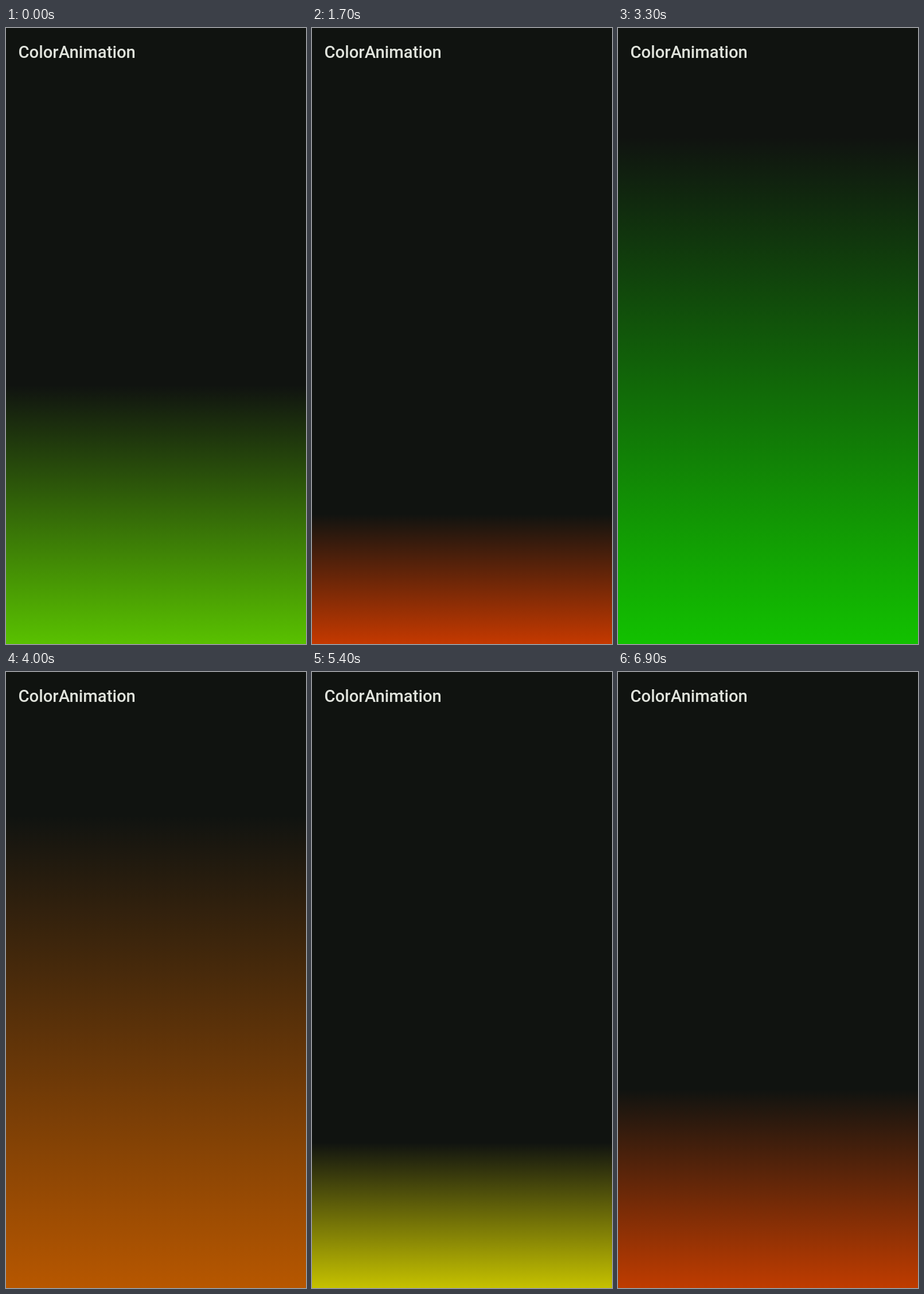
Animation of 523 by 1071 pixels, one loop 7000 ms. Source, as an HTML page:

```html
<!DOCTYPE html>
<html lang="en">
<head>
<meta charset="utf-8">
<title>ColorAnimation</title>
<style>
  html, body { margin: 0; width: 100%; height: 100%; overflow: hidden; background: #101310; }
  #glow { position: absolute; left: 0; right: 0; bottom: 0; }
  svg { position: absolute; left: 0; top: 0; }
  text { font: 500 29.3px Roboto, sans-serif; fill: #e0e3dc; }
</style>
</head>
<body>
<div id="glow"></div>
<svg width="523" height="80"><text x="21.4" y="51.5">ColorAnimation</text></svg>
<script>
const LOOP = 7000, STEP = 100;

// [time in ms, glow height in px]
const heights = [
  [0, 450], [1000, 60], [1130, 8], [1600, 184], [2400, 520], [3200, 860], [3300, 882],
  [3575, 950], [4000, 822], [4800, 500], [5400, 253], [6030, 5], [6900, 346], [7000, 386]
];

// Oklab colours
const red = [0.628, 0.225, 0.126];
const yellow = [0.968, -0.0714, 0.1986];
const green = [0.8664, -0.2339, 0.1795];

const colors = [
  [-540, yellow], [525, green], [1515, red], [2440, yellow], [3440, green],
  [4600, red], [5470, yellow], [6320, green], [7280, red]
];

const lerp = (a, b, f) => a + (b - a) * f;

// Neighbouring keys around t and the fraction between them
function span(keys, t) {
  let i = 1;
  while (i < keys.length - 1 && t >= keys[i][0]) i++;
  const [t0, a] = keys[i - 1], [t1, b] = keys[i];
  return [a, b, (t - t0) / (t1 - t0)];
}

// cubic-bezier(.4, 0, .2, 1)
function ease(x) {
  let lo = 0, hi = 1;
  for (let i = 0; i < 24; i++) {
    const s = (lo + hi) / 2, r = 1 - s;
    if (1.2 * s * r * r + 0.6 * s * s * r + s * s * s < x) lo = s; else hi = s;
  }
  return lo * lo * (3 - 2 * lo);
}

function gamma(v) {
  v = Math.min(1, Math.max(0, v));
  return v <= 0.0031308 ? 12.92 * v : 1.055 * v ** (1 / 2.4) - 0.055;
}

function toRgb([L, a, b]) {
  const l = (L + 0.3963 * a + 0.2158 * b) ** 3;
  const m = (L - 0.1056 * a - 0.0639 * b) ** 3;
  const s = (L - 0.0895 * a - 1.2915 * b) ** 3;
  const r = gamma(4.0767 * l - 3.3077 * m + 0.231 * s);
  const g = gamma(-1.2684 * l + 2.6098 * m - 0.3413 * s);
  return `rgb(${Math.round(r * 197)}, ${Math.round(g * 193)}, 0)`;
}

const glow = document.getElementById("glow");
const start = performance.now();

function draw(now) {
  const t = Math.floor(Math.max(0, now - start) % LOOP / STEP) * STEP;
  const [c0, c1, f] = span(colors, t);
  const k = ease(f);
  const color = toRgb(c0.map((v, i) => lerp(v, c1[i], k)));
  glow.style.height = lerp(...span(heights, t)) + "px";
  glow.style.background = `linear-gradient(transparent, ${color})`;
  requestAnimationFrame(draw);
}
draw(start);
</script>
</body>
</html>
```
